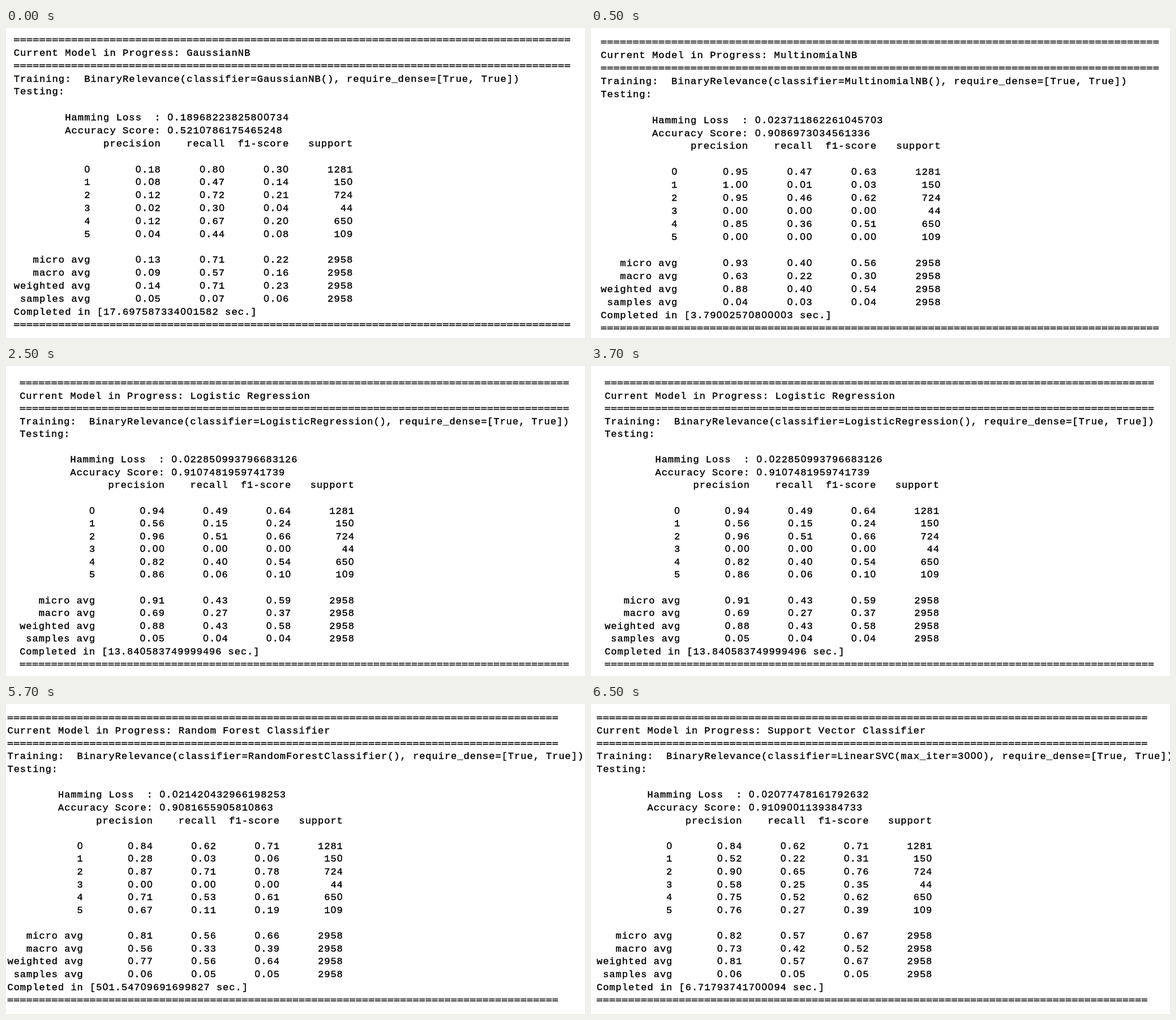
Write an HTML page with a canvas that moves like this. It is 1023x547 px and loops after 8 s.

```html
<!DOCTYPE html>
<html lang="en">
<head>
<meta charset="utf-8">
<title>Classifier reports</title>
<style>
  html, body { margin: 0; width: 100%; height: 100%; overflow: hidden; background: #fff; }
  canvas { display: block; }
</style>
</head>
<body>
<canvas id="stage" width="1023" height="547"></canvas>
<script>
const ctx = document.getElementById('stage').getContext('2d');
const LOOP = 8000;
const RULE = '='.repeat(87);
const LABELS = ['0', '1', '2', '3', '4', '5', '', 'micro avg', 'macro avg', 'weighted avg', 'samples avg'];
const SUPPORT = ['1281', '150', '724', '44', '650', '109', '', '2958', '2958', '2958', '2958'];

// x, y: left edge and first baseline; cell: character advance; pitch: line height
const reports = [
  {
    start: 0, x: 13.2, y: 26, cell: 11.315, pitch: 22.85,
    title: 'GaussianNB', model: 'GaussianNB()',
    loss: '0.18968223825800734', accuracy: '0.5210786175465248', time: '17.697587334001582',
    scores: ['0.18 0.80 0.30', '0.08 0.47 0.14', '0.12 0.72 0.21', '0.02 0.30 0.04', '0.12 0.67 0.20',
      '0.04 0.44 0.08', '', '0.13 0.71 0.22', '0.09 0.57 0.16', '0.14 0.71 0.23', '0.05 0.07 0.06']
  },
  {
    start: 500, x: 16.8, y: 30, cell: 11.345, pitch: 22.93,
    title: 'MultinomialNB', model: 'MultinomialNB()',
    loss: '0.023711862261045703', accuracy: '0.9086973034561336', time: '3.79002570800003',
    scores: ['0.95 0.47 0.63', '1.00 0.01 0.03', '0.95 0.46 0.62', '0.00 0.00 0.00', '0.85 0.36 0.51',
      '0.00 0.00 0.00', '', '0.93 0.40 0.56', '0.63 0.22 0.30', '0.88 0.40 0.54', '0.04 0.03 0.04']
  },
  {
    start: 2500, x: 23.7, y: 35, cell: 11.165, pitch: 22.56,
    title: 'Logistic Regression', model: 'LogisticRegression()',
    loss: '0.022850993796683126', accuracy: '0.9107481959741739', time: '13.840583749999496',
    scores: ['0.94 0.49 0.64', '0.56 0.15 0.24', '0.96 0.51 0.66', '0.00 0.00 0.00', '0.82 0.40 0.54',
      '0.86 0.06 0.10', '', '0.91 0.43 0.59', '0.69 0.27 0.37', '0.88 0.43 0.58', '0.05 0.04 0.04']
  },
  {
    start: 4500, x: 2, y: 29.5, cell: 11.195, pitch: 22.63,
    title: 'Random Forest Classifier', model: 'RandomForestClassifier()',
    loss: '0.021420432966198253', accuracy: '0.9081655905810863', time: '501.54709691699827',
    scores: ['0.84 0.62 0.71', '0.28 0.03 0.06', '0.87 0.71 0.78', '0.00 0.00 0.00', '0.71 0.53 0.61',
      '0.67 0.11 0.19', '', '0.81 0.56 0.66', '0.56 0.33 0.39', '0.77 0.56 0.64', '0.06 0.05 0.05']
  },
  {
    start: 6500, x: 9.5, y: 29.5, cell: 11.195, pitch: 22.63,
    title: 'Support Vector Classifier', model: 'LinearSVC(max_iter=3000)',
    loss: '0.02077478161792632', accuracy: '0.9109001139384733', time: '6.71793741700094',
    scores: ['0.84 0.62 0.71', '0.52 0.22 0.31', '0.90 0.65 0.76', '0.58 0.25 0.35', '0.75 0.52 0.62',
      '0.76 0.27 0.39', '', '0.82 0.57 0.67', '0.73 0.42 0.52', '0.81 0.57 0.67', '0.06 0.05 0.05']
  }
];

function row(label, cells) {
  return label.padStart(12) + ' ' + cells.map(c => c.padStart(10)).join('');
}

function reportLines(r) {
  return [
    RULE,
    'Current Model in Progress: ' + r.title,
    RULE,
    `Training:  BinaryRelevance(classifier=${r.model}, require_dense=[True, True])`,
    'Testing:',
    '',
    ' '.repeat(8) + 'Hamming Loss  : ' + r.loss,
    ' '.repeat(8) + 'Accuracy Score: ' + r.accuracy,
    row('', ['precision', 'recall', 'f1-score', 'support']),
    '',
    ...LABELS.map((label, i) => row(label, [...r.scores[i].split(' '), SUPPORT[i]])),
    `Completed in [${r.time} sec.]`,
    RULE
  ];
}

// double dashed line, one dash per character cell
function drawRule(r, y) {
  for (let i = 0; i < RULE.length; i++) {
    const x = r.x + (i + 0.06) * r.cell;
    ctx.fillRect(x, y - 7.6, r.cell * 0.88, 1.6);
    ctx.fillRect(x, y - 4.4, r.cell * 0.88, 1.6);
  }
}

// each glyph is centred in its cell; zeros use a face without the inner dot
function drawText(text, r, y) {
  const size = r.cell * 1.53;
  const mono = `${size}px "Liberation Mono", "Courier New", monospace`;
  const sans = `${size}px "Liberation Sans", Arial, sans-serif`;
  [...text].forEach((c, i) => {
    const x = r.x + (i + 0.5) * r.cell;
    ctx.font = c === '0' ? sans : mono;
    ctx.fillText(c, x, y);
    ctx.strokeText(c, x, y);
  });
}

function drawReport(r) {
  ctx.fillStyle = '#fff';
  ctx.fillRect(0, 0, 1023, 547);
  ctx.fillStyle = ctx.strokeStyle = '#000';
  ctx.lineWidth = 0.4;
  ctx.textAlign = 'center';
  reportLines(r).forEach((text, i) => {
    const draw = text === RULE ? drawRule : drawText;
    draw(text === RULE ? r : text, text === RULE ? r.y + i * r.pitch : r, r.y + i * r.pitch);
  });
}

const began = performance.now();
let shown = null;

function tick() {
  const t = (performance.now() - began) % LOOP;
  const current = reports.findLast(r => t >= r.start);
  if (current !== shown) drawReport(shown = current);
  requestAnimationFrame(tick);
}
tick();
</script>
</body>
</html>
```
